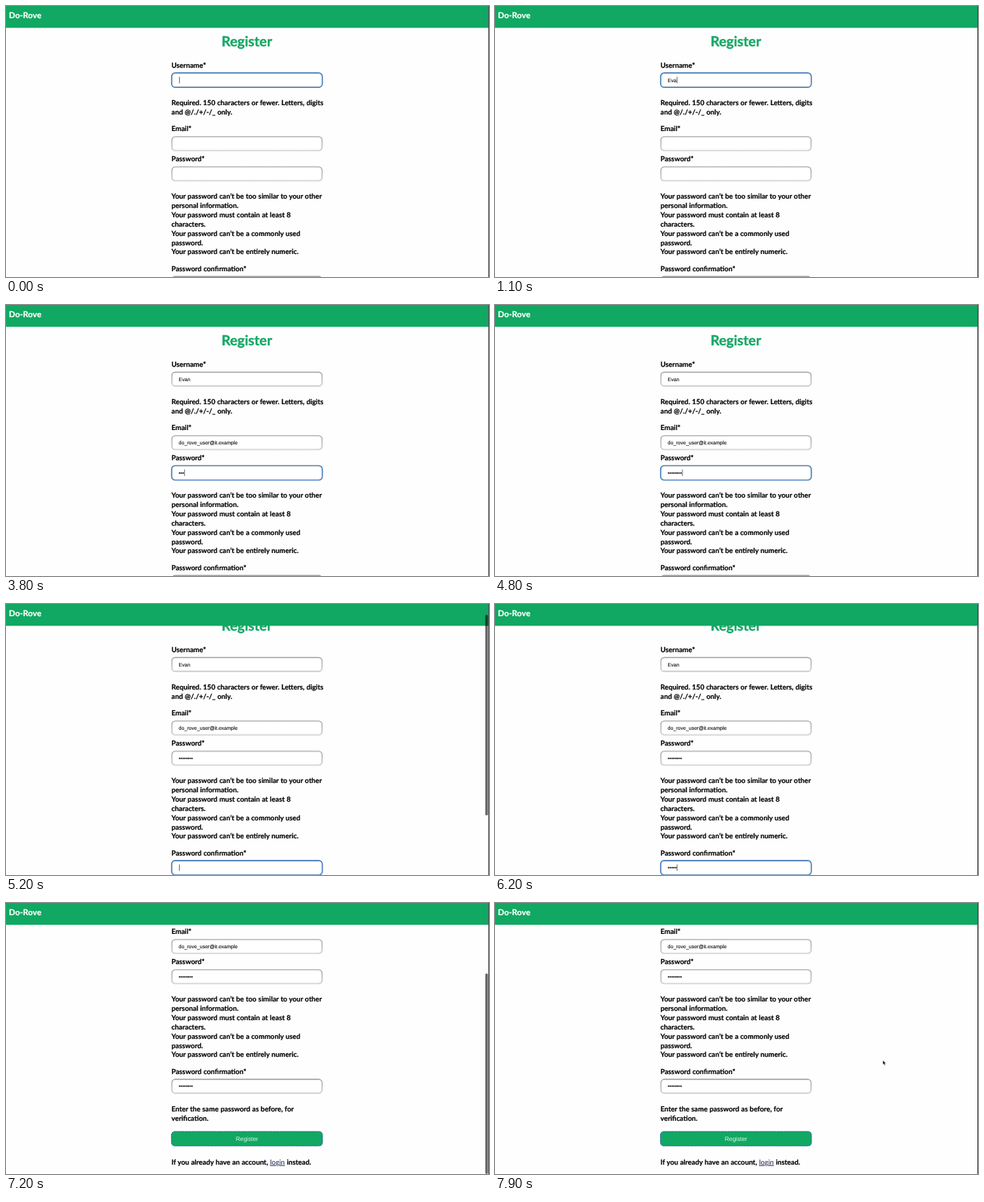
Recreate the animation shown at these times as an HTML page. Size 670 by 377 pixels, loop 8000 ms.

```html
<!DOCTYPE html>
<html lang="en">
<head>
<meta charset="utf-8">
<title>Register</title>
<style>
  html, body { margin: 0; width: 100%; height: 100%; overflow: hidden; background: #fefefe; }
  svg { display: block; text-rendering: geometricPrecision; }
  text {
    font: 700 9.75px Lato, Carlito, sans-serif; word-spacing: .25px; white-space: pre;
    fill: #080808; stroke: #080808; stroke-width: .22;
  }
  .title { font-size: 19.3px; fill: #16a765; stroke: #16a765; stroke-width: .4; text-anchor: middle; }
  .brand { font-size: 11.5px; fill: #fff; stroke: #fff; }
  .link { font-weight: 400; fill: #1c2450; stroke: none; text-decoration: underline; }
  .value, .label { font: 400 7px "Liberation Sans", Arial, sans-serif; word-spacing: 0; stroke-width: .1; }
  .label { font-size: 8.4px; fill: #e4f6ec; stroke: none; text-anchor: middle; }
  .box { fill: #fff; stroke: url(#edge); stroke-width: 1.4; }
  .inner { fill: none; stroke: #f0f0f0; }
  .ring { fill: none; stroke: #4480c2; stroke-width: 1.4; }
  .caret { fill: #444; }
</style>
</head>
<body>
<svg width="670" height="377" viewBox="0 0 670 377">
  <defs>
    <linearGradient id="edge" x2="0" y2="1">
      <stop offset="0" stop-color="#9c9c9c"/>
      <stop offset="1" stop-color="#c4c4c4"/>
    </linearGradient>
  </defs>
  <g id="page"></g>
  <rect x="669" width="1" height="377" fill="#4a4a4a"/>
  <rect width="669" height="30.4" fill="#10a862"/>
  <text class="brand" x="4" y="17.3">Do-Rove</text>
  <rect id="bar" x="664.8" width="3.8" height="279" rx="1.9" fill="#000" opacity=".58"/>
  <path id="pointer" d="M0 0V6.2L1.5 4.9L2.5 7.2L3.6 6.7L2.6 4.5H4.5Z" fill="#111" stroke="#fff" stroke-width=".5"/>
</svg>
<script>
const LOOP = 8000, LEFT = 229.5, WIDTH = 209.5, HEIGHT = 20.5, LEADING = 12.82;
const SUBMIT = 7200, BLINK = 480, BAR_TIME = 500;
const page = document.getElementById('page');
const bar = document.getElementById('bar');
const pointer = document.getElementById('pointer');
const dots = '•'.repeat(8);

// from: focus time, first: first key, pace: ms per character
const form = [
  { label: 'Username*', value: 'Evan', from: 0, first: 800, pace: 150,
    help: ['Required. 150 characters or fewer. Letters, digits', 'and @/./+/-/_ only.'] },
  { label: 'Email*', value: 'do_rove_user@it.example', from: 2400, first: 2600, pace: 25 },
  { label: 'Password*', value: dots, from: 3500, first: 3500, pace: 150,
    help: ['Your password can’t be too similar to your other', 'personal information.',
      'Your password must contain at least 8', 'characters.',
      'Your password can’t be a commonly used', 'password.',
      'Your password can’t be entirely numeric.'] },
  { label: 'Password confirmation*', value: dots, from: 5200, first: 5600, pace: 150,
    help: ['Enter the same password as before, for', 'verification.'] }
];
form.forEach((f, i) => f.to = i + 1 < form.length ? form[i + 1].from : SUBMIT);

function add(tag, attrs, text = '') {
  const el = document.createElementNS('http://www.w3.org/2000/svg', tag);
  for (const k in attrs) el.setAttribute(k, attrs[k]);
  el.textContent = text;
  page.append(el);
  return el;
}

function frame(cls, y, inset) {
  return add('rect', {
    class: cls, rx: 5.2 - inset, x: LEFT + inset, y: y + inset,
    width: WIDTH - 2 * inset, height: HEIGHT - 2 * inset
  });
}

// Lays out one labelled field and returns the next label's baseline.
function layField(f, y) {
  add('text', { x: LEFT, y }, f.label);
  const top = y + 7.1;
  frame('box', top, .6);
  frame('inner', top, 1.8);
  f.ring = frame('ring', top, .1);
  f.text = add('text', { class: 'value', x: 239.6, y: top + 12.7 });
  f.caret = add('rect', { class: 'caret', y: top + 5.6, width: .8, height: 9 });
  if (!f.help) return top + 34.9;
  f.help.forEach((row, i) => add('text', { x: LEFT, y: top + 45.2 + i * LEADING }, row));
  return top + 55.6 + f.help.length * LEADING;
}

add('text', { class: 'title', x: 334, y: 56 }, 'Register');
const end = form.reduce((y, f) => layField(f, y), 85.8);
add('rect', {
  x: LEFT, y: end - 8, width: WIDTH, height: 20, rx: 5, fill: '#10a862',
  stroke: '#2a6f9e', 'stroke-width': 1.2, 'stroke-dasharray': '2 .6'
});
add('text', { class: 'label', x: 334.3, y: end + 5 }, 'Register');
add('text', { x: LEFT, y: end + 37.8 }).innerHTML =
  'If you already have an account, <tspan class="link">login</tspan> instead.';

const show = (el, on) => el.setAttribute('visibility', on ? 'visible' : 'hidden');
const clamp = (v, lo, hi) => Math.min(hi, Math.max(lo, v));

function drawField(f, t) {
  const active = t >= f.from && t < f.to;
  const size = f.value.length;
  const count = clamp(Math.floor((t - f.first) / f.pace) + 1, 0, size);
  const typing = count > 0 && count < size;
  const text = f.value.slice(0, count);
  if (f.text.textContent !== text) f.text.textContent = text;
  show(f.ring, active);
  show(f.caret, active && (typing || Math.floor(t / BLINK) % 2 === 0));
  f.caret.setAttribute('x', 240 + (text ? f.text.getComputedTextLength() : 0));
}

function draw(t) {
  form.forEach(f => drawField(f, t));

  const confirm = form[3].from;
  const scroll = t < confirm ? 0 : t < SUBMIT ? 19 : 131;
  page.setAttribute('transform', `translate(0 ${-scroll})`);
  bar.setAttribute('y', 1 + scroll * .74);
  show(bar, [confirm, SUBMIT].some(s => t >= s && t < s + BAR_TIME));

  const move = SUBMIT + BAR_TIME;
  const rest = 1 - clamp((t - move) / 200, 0, 1);
  show(pointer, t >= move);
  pointer.setAttribute('transform', `translate(${538 + 14 * rest} ${218.8 + 12 * rest})`);
}

const start = performance.now();
function tick(now) {
  draw(Math.max(0, now - start) % LOOP);
  requestAnimationFrame(tick);
}
draw(0);
requestAnimationFrame(tick);
</script>
</body>
</html>
```
